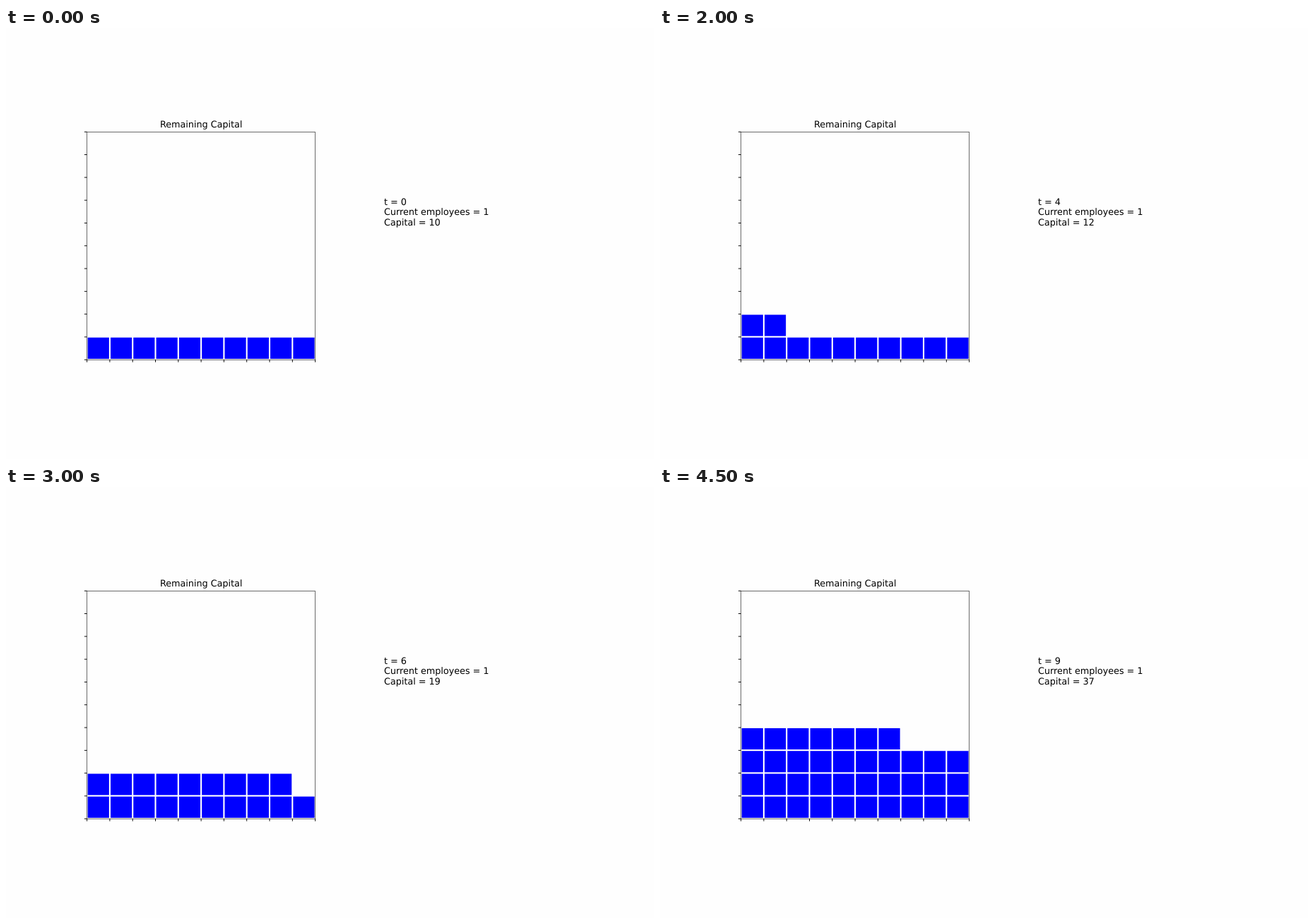
Write a matplotlib script that moves like this. It is 917 by 611 pixels and loops after 5 s.

```python
import matplotlib.pyplot as plt
from matplotlib.animation import FuncAnimation
from matplotlib.patches import Rectangle

W, H, DPI = 917, 611, 64
PT = 72 / DPI                      # points per pixel
STEPS, STEP_MS = 10, 500
LEFT, TOP, SIDE, N = 114.6, 147.05, 323.0, 10
CELL, GAP = SIDE / N, 2.12
BG = "#fefefe"

plt.rcParams["font.family"] = "DejaVu Sans"
plt.rcParams["text.hinting"] = "none"

fig = plt.figure(figsize=(W / DPI, H / DPI), dpi=DPI, facecolor=BG)
ax = fig.add_axes([0, 0, 1, 1])
ax.set_xlim(0, W)
ax.set_ylim(H, 0)
ax.axis("off")


def line(xs, ys, width):
    ax.plot(xs, ys, color="black", lw=width * PT, snap=False,
            solid_capstyle="butt", zorder=3)


def label(x, y, text="", **kw):
    return ax.text(x, y, text, fontsize=12.74 * PT, va="baseline", **kw)


def capital(t):
    return 10 + t * (t - 3) // 2


# Frame and ticks
x0, x1, y0, y1 = 114.5, 437.5, 147.4, 470.4
line([x0, x1, x1, x0, x0], [y0, y0, y1, y1, y0], 0.58)
for k in range(N + 1):
    x, y = LEFT + k * CELL, TOP + k * CELL
    line([x, x], [470.1, 473.8], 0.95)
    line([110.9, 114.6], [y + 0.2, y + 0.2], 0.95)

# Unit squares, filled row by row from the bottom left
cells = []
for i in range(N * N):
    row, col = divmod(i, N)
    cell = Rectangle((LEFT + col * CELL + GAP / 2,
                      TOP + SIDE - (row + 1) * CELL + GAP / 2),
                     CELL - GAP, CELL - GAP, fc="blue", lw=0, snap=False)
    cells.append(ax.add_patch(cell))

label(LEFT + SIDE / 2, 141, "Remaining Capital", ha="center")
time_text = label(534.6, 251)
label(534.6, 265.4, "Current employees = 1")
capital_text = label(534.6, 280)


def update(t):
    total = capital(t)
    for i, cell in enumerate(cells):
        cell.set_visible(i < total)
    time_text.set_text(f"t = {t}")
    capital_text.set_text(f"Capital = {total}")
    return [*cells, time_text, capital_text]


anim = FuncAnimation(fig, update, frames=STEPS, interval=STEP_MS,
                     init_func=lambda: update(0), repeat=True, repeat_delay=0)
plt.show()
```
